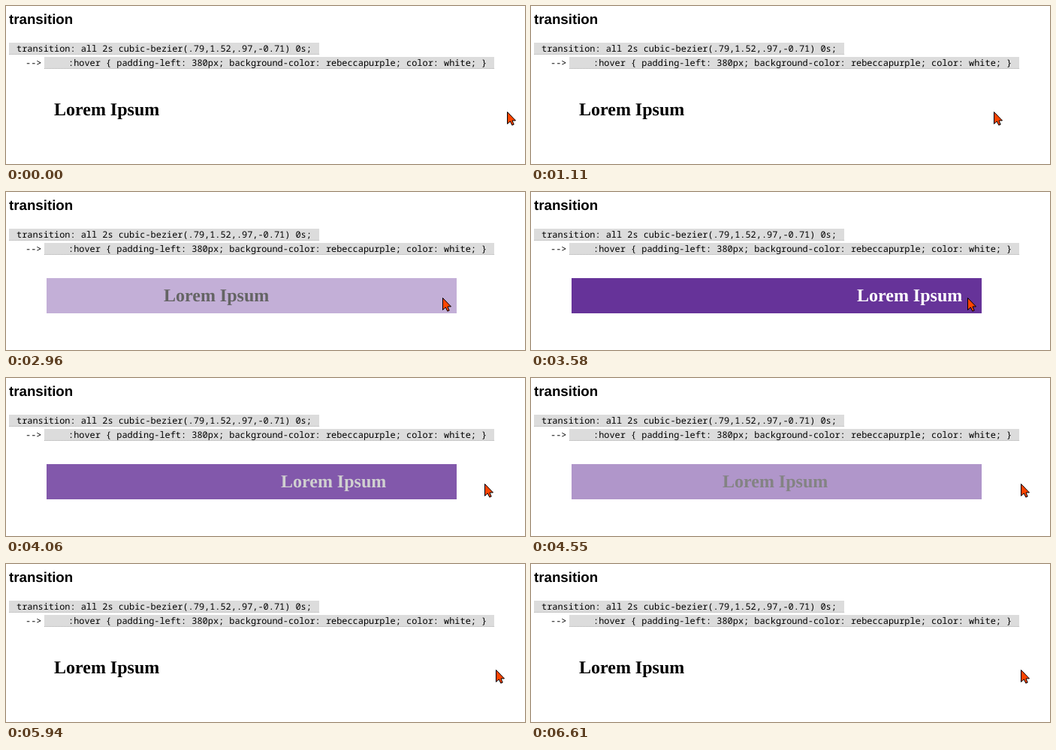
An HTML page that plays this animation: 691x211 px, repeating every 6660 ms.

```html
<!DOCTYPE html>
<html lang="en">
<head>
<meta charset="utf-8">
<title>transition</title>
<style>
  html, body { margin: 0; width: 100%; height: 100%; overflow: hidden; background: #fff; }
  svg { display: block; }
  text { white-space: pre; text-rendering: geometricPrecision; }
  .title { font: bold 18.72px "Liberation Sans", Arial, sans-serif; }
  .code { font: 11.91px "Noto Sans Mono", "DejaVu Sans Mono", monospace; }
  .demo { font: bold 24px "Liberation Serif", "Times New Roman", serif; }
  .mark { fill: #dcdcdc; shape-rendering: crispEdges; }
  .dots { stroke: #b4b4b4; stroke-dasharray: 1 1; shape-rendering: crispEdges; }
</style>
</head>
<body>
<svg width="691" height="211" viewBox="0 0 691 211">
  <text class="title" x="4" y="24">transition</text>

  <rect class="mark" x="4" y="49" width="413" height="16"/>
  <path class="dots" d="M4 64.5H417"/>
  <text class="code" x="14" y="61">transition: all 2s cubic-bezier(.79,1.52,.97,-0.71) 0s;</text>

  <text class="code" x="26" y="80">--&gt;</text>
  <rect class="mark" x="51" y="68" width="599" height="16"/>
  <path class="dots" d="M51 83.5H650"/>
  <text class="code" x="83" y="80">:hover { padding-left: 380px; background-color: rebeccapurple; color: white; }</text>

  <rect id="box" x="54" y="115" width="546" height="47" fill="#639" fill-opacity="0" shape-rendering="crispEdges"/>
  <text id="label" class="demo" x="64" y="146">Lorem Ipsum</text>

  <path id="cursor" d="M.5 .5V16.5L4.3 13L6.8 18.2L9.2 17.2L7 12H11.5Z" fill="#ff4500" stroke="#000"/>
</svg>
<script>
const LOOP = 6660, DURATION = 2000;
const ENTER = 1325, LEAVE = 3855;
const box = document.getElementById("box");
const label = document.getElementById("label");
const cursor = document.getElementById("cursor");

const clamp = v => Math.min(1, Math.max(0, v));
const smooth = u => u * u * (3 - 2 * u);
const bezier = (a, b, s) =>
  3 * (1 - s) * (1 - s) * s * a + 3 * (1 - s) * s * s * b + s * s * s;

// cubic-bezier(.79, 1.52, .97, -0.71)
function ease(u) {
  if (u <= 0) return 0;
  if (u >= 1) return 1;
  let lo = 0, hi = 1;
  for (let i = 0; i < 30; i++) {
    const mid = (lo + hi) / 2;
    if (bezier(0.79, 0.97, mid) < u) lo = mid; else hi = mid;
  }
  return bezier(1.52, -0.71, lo);
}

const approach = [[790, 667], [1110, 616], [1310, 600], [1480, 581]];

function cursorX(t) {
  if (t >= 3660) return 581 + 71 * smooth(clamp((t - 3660) / 570));
  let x = approach[0][1];
  for (let i = 1; i < approach.length; i++) {
    const [t0, x0] = approach[i - 1], [t1, x1] = approach[i];
    x += (x1 - x0) * clamp((t - t0) / (t1 - t0));
  }
  return x;
}

function draw(t) {
  const p = ease((t - ENTER) / DURATION) - ease((t - LEAVE) / DURATION);
  const grey = Math.round(255 * p);
  box.setAttribute("fill-opacity", p);
  label.setAttribute("x", Math.round(64 + 370 * p));
  label.setAttribute("fill", `rgb(${grey},${grey},${grey})`);
  cursor.setAttribute("transform", `translate(${Math.round(cursorX(t))} 141)`);
}

const start = performance.now();
function tick() {
  draw((performance.now() - start) % LOOP);
  requestAnimationFrame(tick);
}
tick();
</script>
</body>
</html>
```
